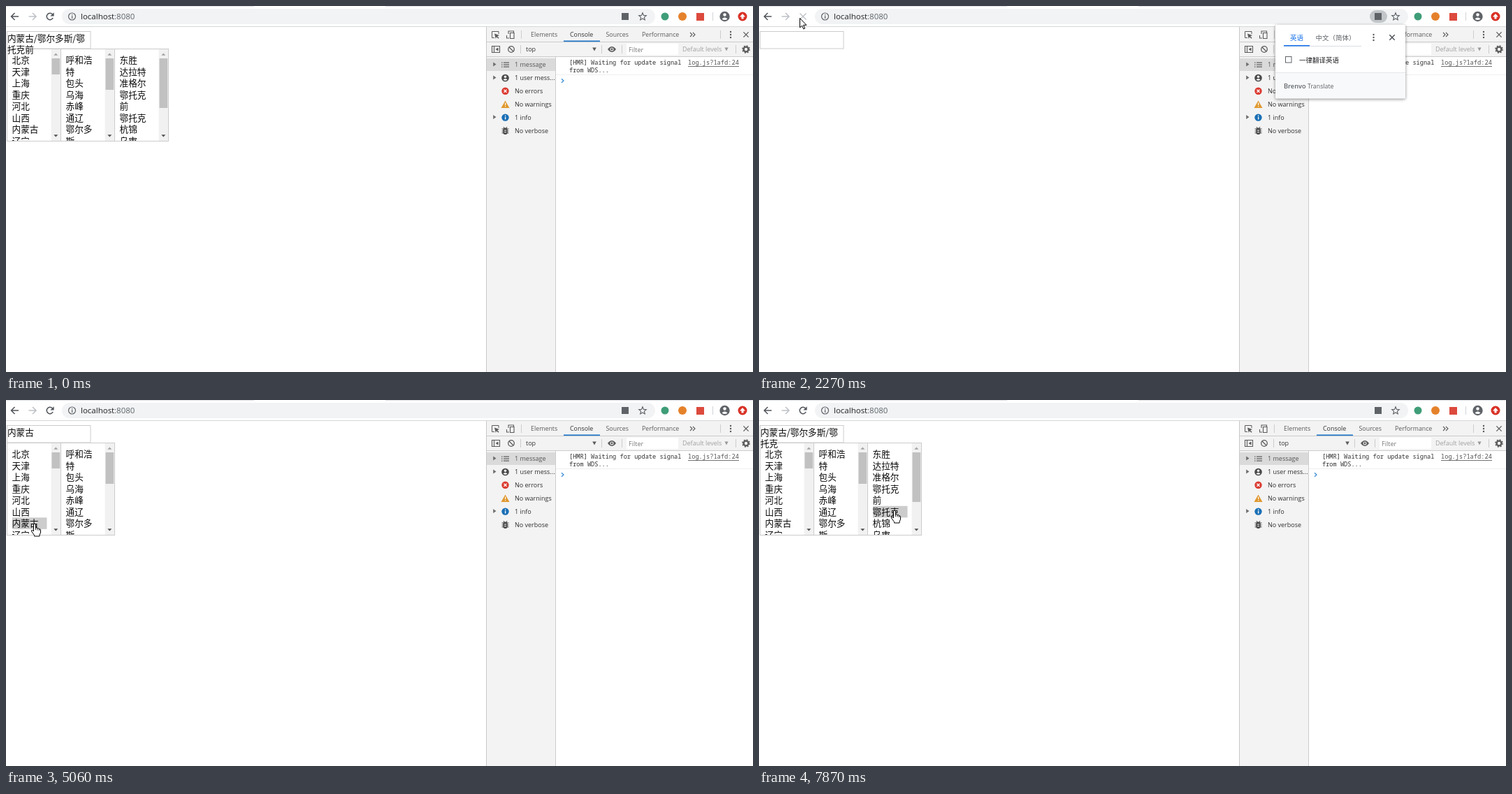
Write an HTML page with a canvas that moves like this. It is 1069x524 px and loops after 8 s.

```html
<!DOCTYPE html>
<html lang="zh">
<head>
<meta charset="utf-8">
<title>Cascading menu</title>
<style>
html, body { margin: 0; width: 100%; height: 100%; overflow: hidden; background: #fff; }
canvas { display: block; width: 1069px; height: 524px; }
</style>
</head>
<body>
<canvas id="stage" width="1069" height="524"></canvas>
<script>
const ctx = document.getElementById('stage').getContext('2d');
const LOOP = 8000;
const UI = '"Open Sans", "Noto Sans", sans-serif';
const HAN = '"Noto Sans CJK SC", "Noto Sans CJK", sans-serif';
const MONO = '"Noto Sans Mono", "DejaVu Sans Mono", monospace';
const DARK = '#5f6368', INK = '#5a5a5a', BLUE = '#1a73e8';

// ---- helpers ----
function rect(x, y, w, h, color) {
  ctx.fillStyle = color;
  ctx.fillRect(x, y, w, h);
}
function frame(x, y, w, h, color) {
  ctx.strokeStyle = color;
  ctx.lineWidth = 1;
  ctx.strokeRect(x, y, w, h);
}
function round(x, y, w, h, r, color) {
  ctx.beginPath();
  ctx.roundRect(x, y, w, h, r);
  ctx.fillStyle = color;
  ctx.fill();
}
function disc(x, y, r, color) {
  ctx.beginPath();
  ctx.arc(x, y, r, 0, 7);
  ctx.fillStyle = color;
  ctx.fill();
}
function ring(x, y, r, color, w = 1) {
  ctx.beginPath();
  ctx.arc(x, y, r, 0, 7);
  ctx.strokeStyle = color;
  ctx.lineWidth = w;
  ctx.stroke();
}
function path(x, y, d, fill, stroke, w = 1) {
  const p = new Path2D(d);
  ctx.save();
  ctx.translate(x, y);
  ctx.lineWidth = w;
  if (fill) { ctx.fillStyle = fill; ctx.fill(p); }
  if (stroke) { ctx.strokeStyle = stroke; ctx.stroke(p); }
  ctx.restore();
}
function text(s, x, y, size, color, family = UI, weight = 400) {
  ctx.font = `${weight} ${size}px ${family}`;
  ctx.fillStyle = color;
  ctx.fillText(s, x, y);
}
const han = (s, x, mid, size = 12.65, color = '#0a0a0a') => text(s, x, mid + size * 0.37, size, color, HAN);
const label = (s, x, mid, color = '#333', size = 9) => text(s, x, mid + 3.2, size, color);

// ---- pointer ----
// start, end, steps, x, y
const moves = [
  [110, 280, 3, 770, 380],
  [430, 1040, 9, 43, 20],
  [1120, 1120, 1, 48, 14],
  [1200, 1200, 1, 50, 15],
  [1280, 1430, 3, 58, 17],
  [2520, 2900, 6, 48, 45],
  [3280, 3665, 6, 42, 165],
  [3740, 4050, 5, 41, 177],
  [5380, 5700, 5, 116, 177],
  [6940, 7090, 3, 210, 161],
  [7240, 7640, 6, 199, 158],
  [7870, 7870, 1, 194, 158]
];
function pointerAt(t) {
  let x = 1107, y = 575;
  for (const [t0, t1, n, tx, ty] of moves) {
    if (t < t0) break;
    const gap = n > 1 ? (t1 - t0) / (n - 1) : 1;
    const k = Math.min(n, Math.floor((t - t0) / gap + 1e-6) + 1) / n;
    x += (tx - x) * k;
    y += (ty - y) * k;
  }
  return { x: Math.round(x), y: Math.round(y) };
}
function drawPointer({ x, y }, hand) {
  if (hand) {
    path(x, y, 'M-1.5 1Q0-1 1.5 1V6Q3.5 5 4 6.8Q6 6 6.4 7.8Q8.3 7.3 8.5 9V13L7 16V18H-.5V16.5L-4.5 11Q-4.8 9-3 9.4L-1.5 11Z', '#fff', '#000');
    path(x, y, 'M1.5 6V9M4 7V9.5M6.4 8V10', null, '#000', 0.8);
  } else {
    path(x + 0.5, y + 0.5, 'M0 0V13.4L3.1 10.6L5.2 15.4L7.2 14.6L5.1 9.8H9.4Z', '#fff', '#000');
  }
}

// ---- browser bar ----
function star(x, y, r) {
  ctx.beginPath();
  for (let i = 0; i < 10; i++) {
    const a = i * Math.PI / 5 - Math.PI / 2, q = i % 2 ? r * 0.45 : r;
    ctx.lineTo(x + q * Math.cos(a), y + q * Math.sin(a));
  }
  ctx.closePath();
  ctx.strokeStyle = DARK;
  ctx.lineWidth = 1.1;
  ctx.stroke();
}
function drawBar(loading, marked) {
  rect(0, 0, 355, 1, '#dee1e6');
  rect(543, 0, 526, 1, '#dee1e6');
  rect(0, 29, 1069, 1, '#d5d7da');
  const arrow = 'M5.5 0H-5M0-5L-5 0L0 5';
  path(12.5, 15, arrow, null, '#50545a', 1.5);
  ctx.save();
  ctx.translate(38, 15);
  ctx.scale(-1, 1);
  path(0, 0, arrow, null, '#bdc1c6', 1.5);
  ctx.restore();
  if (loading) {
    path(63, 15, 'M-4.5-4.5L4.5 4.5M4.5-4.5L-4.5 4.5', null, '#bdc1c6', 1.4);
  } else {
    path(63, 15, 'M4.2 2A4.7 4.7 0 1 1 3.4-3.3', null, '#50545a', 1.5);
    path(63, 15, 'M5.6-5.8V-.6H.4Z', '#50545a');
  }
  round(80, 4, 849, 22, 11, '#f1f3f4');
  ring(94.5, 15, 5, DARK, 1.2);
  rect(94, 14, 1.2, 4, DARK);
  rect(94, 12, 1.2, 1.2, DARK);
  text('localhost', 107, 19, 11.5, '#202124');
  text(':8080', 155, 19, 11.5, DARK);
  if (marked) round(874, 6, 25, 18, 9, '#c3c6c9');
  rect(881, 10, 10, 10, DARK);
  star(911, 15.4, 5.6);
  disc(943, 15, 5.5, '#3f9d78');
  disc(968, 15, 6, '#e5812b');
  rect(988, 10, 11, 11, '#dc4a3d');
  rect(1011, 9, 1, 12, '#d0d3d7');
  disc(1028.5, 15, 7.2, DARK);
  disc(1028.5, 12.5, 2.2, '#fff');
  path(1028.5, 15, 'M-4 3.4Q0-.6 4 3.4Q0 6.4-4 3.4Z', '#fff');
  disc(1054, 15, 6.5, '#d93025');
  path(1054, 15, 'M0-4L4 .4H1.5V3.6H-1.5V.4H-4Z', '#fff');
}

// ---- developer panel ----
function gear(x, y) {
  ring(x, y, 3.4, INK, 2.4);
  ctx.setLineDash([2, 1.93]);
  ring(x, y, 5, INK, 1.6);
  ctx.setLineDash([]);
}
function dots(x, y) {
  for (const d of [-4, 0, 4]) disc(x, y + d, 1.2, INK);
}
function person(x, y) {
  disc(x, y, 5.3, '#4a4a4a');
  disc(x, y - 1.7, 1.7, '#fff');
  path(x, y, 'M-3 2.6Q0-.4 3 2.6Q0 5-3 2.6Z', '#fff');
}
function drawPanel(cleared) {
  rect(687, 30, 382, 43, '#f3f3f3');
  rect(687, 73, 99, 451, '#f3f3f3');
  rect(687, 30, 1, 494, '#c8c8c8');
  rect(688, 51, 381, 1, '#ccc');
  rect(688, 72, 381, 1, '#ccc');
  rect(786, 73, 1, 451, '#ccc');

  path(700, 41, 'M5-1V-4.5H-4.5V4.5H-1', null, INK);
  path(700, 41, 'M-1-1.5L6 1L3.2 2.2L5.5 4.8L4.5 5.8L2 3.2L.8 6Z', INK);
  path(722, 41, 'M-2 5H-5.5V1M-3-1V-5H4.5V-3M-.5-2.5H5V5.5H-.5Z', null, INK, 1.1);
  for (const [x, y] of [[737, 35], [1022, 35], [736, 56], [852, 56], [881, 56], [1044, 56]]) rect(x, y, 1, 12, '#ccc');
  label('Elements', 751, 41, INK, 8.9);
  label('Console', 807, 41, '#333', 8.9);
  label('Sources', 858.5, 41, INK, 8.9);
  label('Performance', 910, 41, INK, 8.8);
  rect(798, 49.5, 52, 1.6, '#1a73c8');
  path(982, 41, 'M-3-3L0 0L-3 3M1-3L4 0L1 3', null, INK, 1.1);
  dots(1037, 41);
  path(1059, 41, 'M-3.6-3.6L3.6 3.6M3.6-3.6L-3.6 3.6', null, INK, 1.3);

  path(701, 62, 'M-5.5-4.5H5.5V4.5H-5.5ZM-2.5-4.5V4.5', null, INK, 1.1);
  path(701, 62, 'M3.5-2.5V2.5L-.5 0Z', INK);
  ring(723, 62, 4.3, INK, 1.3);
  path(723, 62, 'M-3-3L3 3', null, INK, 1.3);
  label('top', 744, 62);
  path(842, 61.5, 'M-2.8-2H2.8L0 3Z', INK);
  path(867, 62, 'M-6 0Q0-8 6 0Q0 8-6 0Z', INK);
  disc(867, 62, 2.5, '#f3f3f3');
  disc(867, 62, 1.4, INK);
  rect(888, 54, 74, 16, '#fff');
  label('Filter', 891, 62.5, '#777');
  label('Default levels', 968, 62, '#a0a0a0');
  path(1031, 61.5, 'M-2.6-2H2.6L0 3Z', '#999');
  gear(1059, 62);

  rect(688, 75, 98, 18, '#dadada');
  const names = cleared
    ? ['No messages', 'No user me...', 'No errors', 'No warnings', 'No info', 'No verbose']
    : ['1 message', '1 user mess...', 'No errors', 'No warnings', '1 info', 'No verbose'];
  names.forEach((s, i) => {
    const y = 84 + i * 18.9;
    label(s, 728, y, i ? '#303030' : '#555');
    if (!cleared && (i < 2 || i === 4)) path(699, y - 0.5, 'M-1.8-3V3L2.5 0Z', '#6e6e6e');
  });
  for (const d of [-3, 0, 3]) {
    rect(709, 83.5 + d, 1.5, 1.2, INK);
    rect(712, 83.5 + d, 8, 1.2, INK);
  }
  person(714.5, 103);
  disc(714.5, 121.8, 5.2, '#db3b32');
  path(714.5, 121.8, 'M-2-2L2 2M2-2L-2 2', null, '#fff', 1.3);
  path(714.5, 141, 'M0-5.5L6 5H-6Z', '#e0982f');
  rect(714, 138.5, 1.2, 3.5, '#fff');
  rect(714, 143, 1.2, 1.2, '#fff');
  disc(714.5, 159.6, 5.2, '#1a6fb5');
  rect(713.9, 158.8, 1.4, 3.6, '#fff');
  rect(713.9, 156.5, 1.4, 1.4, '#fff');
  path(714.5, 178.5, 'M-5-2.5H5M-5 .5H5M-5 3.3H5M-2.5-5.2L-1-3M2.5-5.2L1-3', null, '#4a4a4a', 1.1);
  round(711.3, 174.5, 6.4, 9.4, 3, '#4a4a4a');
  rect(713, 177.6, 3, 1, '#f3f3f3');
  rect(713, 180.2, 3, 1, '#f3f3f3');

  if (!cleared) {
    text('[HMR] Waiting for update signal', 806, 84.3, 8.65, '#303030', MONO);
    text('from WDS...', 806, 95.3, 8.65, '#303030', MONO);
    text('log.js?1afd:24', 976, 84.3, 8.68, '#505050', MONO);
    rect(976, 86, 73, 0.8, '#505050');
    rect(787, 98, 282, 1, '#efefef');
  }
  path(796.5, cleared ? 82 : 107, 'M-1.5-2.8L1.5 0L-1.5 2.8', null, '#3b8fd8', 1.3);
}

// ---- page ----
const menus = [
  { rows: ['北京', '天津', '上海', '重庆', '河北', '山西', '内蒙古', '辽宁'], thumb: 23 },
  { rows: ['呼和浩', '特', '包头', '乌海', '赤峰', '通辽', '鄂尔多', '斯'], thumb: 45 },
  { rows: ['东胜', '达拉特', '准格尔', '鄂托克', '前', '鄂托克', '杭锦', '乌审'], thumb: 71 }
];
const ROW = 16.55, TOP = 69, STEP = 77;
const wraps = s => s === '特' || s === '斯' || s === '前';

function hovered(p, open) {
  const col = Math.floor((p.x - 9) / STEP), row = Math.floor((p.y - TOP) / ROW);
  const inside = col >= 0 && col < open && p.x - 9 - col * STEP < 49.5;
  if (!inside || row < 0 || row > 7 || p.y > 193) return null;
  const rows = menus[col].rows;
  const first = wraps(rows[row]) ? row - 1 : row;
  const count = first < 7 && wraps(rows[first + 1]) ? 2 : 1;
  return { col, first, count };
}
function drawMenu({ rows, thumb }, i, hit) {
  const x = 1 + i * STEP;
  ctx.save();
  ctx.beginPath();
  ctx.rect(x, 61, 78, 132.5);
  ctx.clip();
  if (hit && hit.col === i) rect(x + 8, TOP + hit.first * ROW, 49.5, hit.count * ROW, '#ccc');
  rows.forEach((s, r) => han(s, x + 7.5, TOP + (r + 0.5) * ROW));
  rect(x + 63.6, 62, 13.4, 131, '#f1f1f1');
  rect(x + 64.5, 75, 11.7, thumb, '#c1c1c1');
  path(x + 70.3, 69, 'M-3 1.8H3L0-1.6Z', '#a3a3a3');
  path(x + 70.3, 186, 'M-3-1.8H3L0 1.6Z', '#505050');
  ctx.restore();
  frame(x + 0.5, 61.5, 77, 132, '#ccc');
}
function valueAt(t) {
  if (t < 1660) return ['内蒙古/鄂尔多斯/鄂', '托克前'];
  if (t < 4050) return [];
  if (t < 5700) return ['内蒙古'];
  if (t < 7640) return ['内蒙古/鄂尔多斯'];
  return ['内蒙古/鄂尔多斯/鄂', '托克'];
}
function menusOpen(t) {
  if (t < 1660) return 3;
  return [3050, 5060, 6710].filter(start => t >= start).length;
}

function drawPopup() {
  ctx.save();
  ctx.shadowColor = 'rgba(0,0,0,.45)';
  ctx.shadowBlur = 4;
  ctx.shadowOffsetY = 1;
  round(739, 27, 186, 105.5, 2, '#fff');
  ctx.restore();
  rect(739, 96, 186, 36, '#f8f9fa');
  rect(739, 95, 186, 1, '#e4e6e8');
  han('英语', 760, 45, 9.5, BLUE);
  han('中文（简体）', 796.5, 45, 9.5, DARK);
  rect(751, 57, 111, 1, '#dadce0');
  rect(751, 56, 37, 1.6, BLUE);
  dots(879.5, 45);
  path(906, 45, 'M-3.7-3.7L3.7 3.7M3.7-3.7L-3.7 3.7', null, '#50545a', 1.5);
  frame(753.5, 72.5, 8.5, 8.5, DARK);
  han('一律翻译英语', 773, 77, 9.5, '#202124');
  text('Brenvo', 751, 117.5, 9.2, DARK, UI, 600);
  text('Translate', 785, 117.5, 8.8, DARK);
}

function draw(t) {
  rect(0, 0, 1069, 524, '#fff');
  const p = pointerAt(t), open = menusOpen(t), hit = hovered(p, open);
  drawBar(t >= 1430 && t < 2520, t >= 2120 && t < 3434);
  drawPanel(t >= 1660 && t < 1960);
  frame(1.5, 36.5, 119.5, 24.5, '#ccc');
  for (let i = 0; i < open; i++) drawMenu(menus[i], i, hit);
  valueAt(t).forEach((s, i) => han(s, 1.9, 46 + i * 16.5));
  if (t >= 2270 && t < 2900) drawPopup();
  if (t >= 110) drawPointer(p, hit);
}

const begin = performance.now();
function tick() {
  draw((performance.now() - begin) % LOOP);
  requestAnimationFrame(tick);
}
tick();
</script>
</body>
</html>
```
